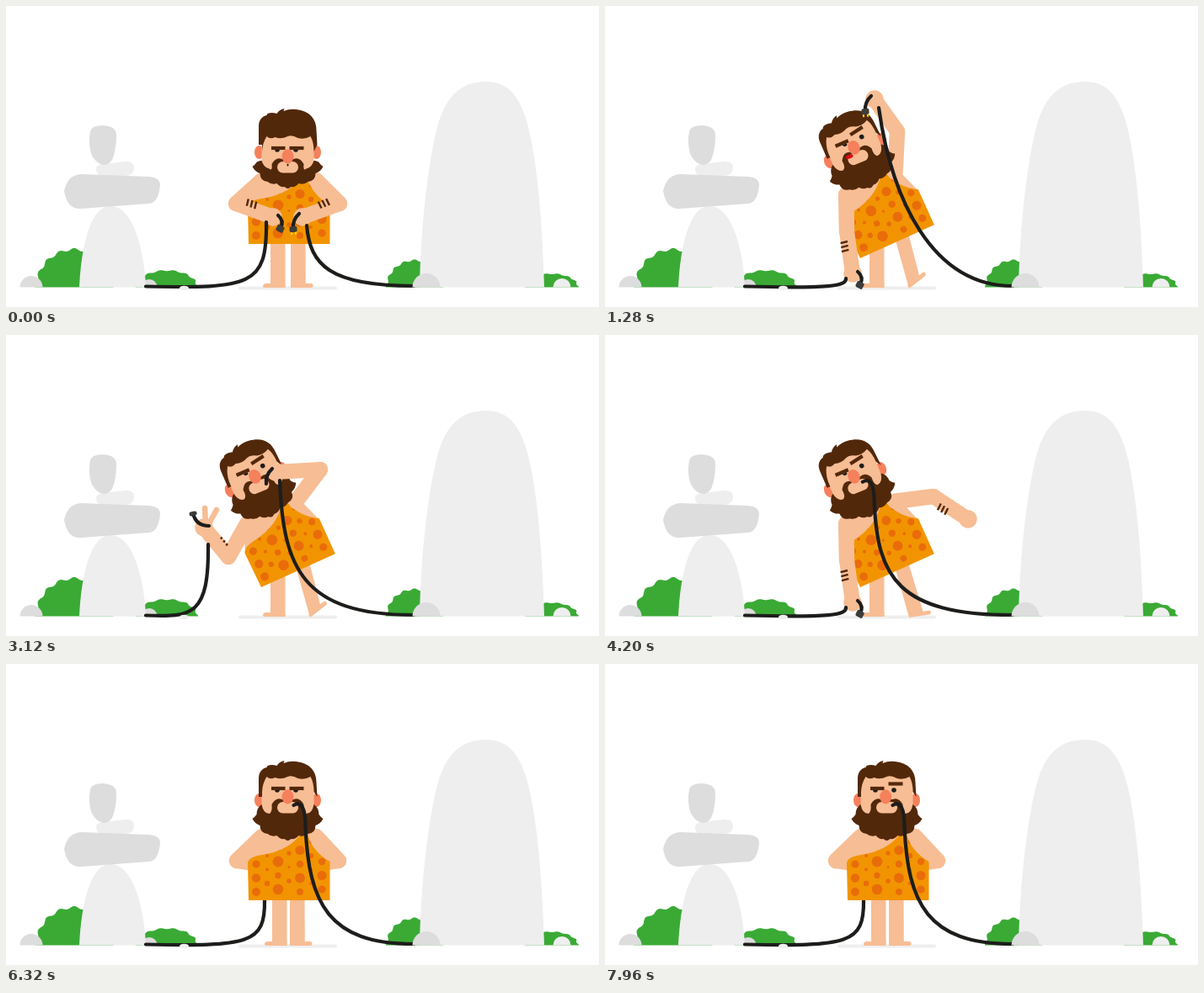
These frames come from a looping animation (704x358 px, 8000 ms). An HTML page with a canvas:

```html
<!DOCTYPE html>
<html lang="en">
<head>
<meta charset="utf-8">
<title>Caveman with cables</title>
<style>
html, body { margin: 0; width: 100%; height: 100%; overflow: hidden; background: #fff; }
canvas { display: block; width: 704px; height: 358px; }
</style>
</head>
<body>
<canvas id="stage" width="704" height="358"></canvas>
<script>
const ctx = document.getElementById('stage').getContext('2d');
const LOOP = 8000, TAU = Math.PI * 2, RAD = Math.PI / 180, GROUND = 334.5;
const SKIN = '#f7bd94', HAIR = '#52280b', PINK = '#f5805c', CLOTH = '#f29400', SPOT = '#e96c0a',
  GREEN = '#3aaa35', PALE = '#eeeeee', GREY = '#dddddd', CORD = '#1d1d1b', PLUG = '#3c3c3b';

// Motion helpers

function ramp(t, from, to) {
  const u = Math.min(1, Math.max(0, (t - from) / (to - from)));
  return u * u * (3 - 2 * u);
}
const mix = (a, b, k) => a + (b - a) * k;
const blend = (a, b, k) => a.map((v, i) => mix(v, b[i], k));
const offset = ([x, y], dx, dy) => [x + dx, y + dy];
function turned([x, y], dx, dy, angle) {
  const c = Math.cos(angle), s = Math.sin(angle);
  return [x + dx * c - dy * s, y + dx * s + dy * c];
}
// Each move is [begin, end, pose].
const follow = (t, first, moves) =>
  moves.reduce((pose, [from, to, next]) => blend(pose, next, ramp(t, from, to)), first);

// Arm poses: elbow, then hand
const mirror = ([ex, ey, hx, hy]) => [669 - ex, ey, 669 - hx, hy];
const FRONT = [273, 235, 317, 251], BEHIND = [274, 234, 300, 238];
const LOW = [287, 268, 294, 318], RAISED = [264, 264, 235, 229];
const OVERHEAD = [347, 149, 320, 111], MOUTH = [373, 160, 320, 163],
  SWING = [372, 152, 362, 117], OUT = [390, 192, 431, 219], HIP = [381, 215, 362, 235];

function poseAt(t) {
  const stand = ramp(t, 5920, 6240), down = 1 - ramp(t, 80, 540);
  const lean = ramp(t, 100, 540) - stand;
  const bob = t > 6320 ? Math.sin(TAU * (t - 6320) / 820) : 0;
  const lookBack = ramp(t, 7360, 7680);
  return {
    t, stand, down, lean,
    body: blend([336, 281 + 2 * down], [346.7, 280.2], lean),
    bodyAngle: -24.4 * RAD * lean,
    head: offset(blend([334.5, 162], [297, 172], lean), 0, 7 * down - bob),
    headAngle: -23 * RAD * lean,
    raise: lean + lookBack,
    gaze: 4 * lean + 2 * ramp(t, 6760, 7040) - 3 * lookBack,
    tongue: ramp(t, 400, 600) - ramp(t, 1450, 1600),
    lift: ramp(t, 1900, 2480) - ramp(t, 3400, 3800),
    release: ramp(t, 3400, 3640),
    left: follow(t, FRONT, [[100, 560, LOW], [1900, 2480, RAISED], [3400, 3800, LOW], [5920, 6240, BEHIND]]),
    right: follow(t, mirror(FRONT), [[100, 620, OVERHEAD], [1300, 1680, MOUTH], [3400, 3640, SWING],
      [3640, 4000, OUT], [4240, 4600, HIP], [5920, 6240, mirror(BEHIND)]])
  };
}

// Drawing helpers

function fill(color, path) {
  ctx.fillStyle = color;
  ctx.fill(typeof path === 'string' ? new Path2D(path) : path);
}
function stroke(color, width, path) {
  ctx.strokeStyle = color;
  ctx.lineWidth = width;
  ctx.stroke(new Path2D(path));
}
function oval(color, x, y, rx, ry = rx, from = 0) {
  ctx.fillStyle = color;
  ctx.beginPath();
  ctx.ellipse(x, y, rx, ry, 0, from, TAU);
  ctx.fill();
}
const mound = (color, x, r) => oval(color, x, GROUND, r, r, Math.PI);
function box(color, x, y, w, h, r = 0) {
  ctx.fillStyle = color;
  ctx.beginPath();
  ctx.roundRect(x, y, w, h, r);
  ctx.fill();
}
function placed([x, y], angle, draw) {
  ctx.save();
  ctx.translate(x, y);
  ctx.rotate(angle);
  draw();
  ctx.restore();
}

// Scenery

function bush(x, rx, ry, waves) {
  ctx.fillStyle = GREEN;
  ctx.beginPath();
  for (let u = 0; u <= 1; u += 1 / 120) {
    const a = Math.PI * (1 + u), r = 1 + .035 * Math.cos(u * TAU * waves);
    ctx.lineTo(x + rx * r * Math.cos(a), GROUND + ry * r * Math.sin(a));
  }
  ctx.fill();
}

function drawScenery() {
  bush(81, 45, 45, 8);
  bush(191, 36, 20, 7);
  bush(485, 33, 32, 8);
  bush(648, 31, 16, 7);
  mound(GREY, 170, 9.5);
  fill(PALE, 'M87 334.5C89 290 99 238 124 238C151 238 164 290 166 334.5Z');
  fill(PALE, 'M107 195Q106 189 115 188L141 185Q152 184 152 192Q152 201 143 202H114Q108 202 107 195Z');
  fill(GREY, 'M100 149Q102 142 115 142Q132 143 131 155Q131 171 126 183Q122 189 116 189Q109 189 102 178Q97 165 100 149Z');
  fill(GREY, 'M69 220Q73 201 89 200L170 203Q183 204 183 213Q181 234 170 235L90 241Q73 243 69 220Z');
  mound(GREY, 30, 13.5);
  fill(PALE, 'M491 334.5C492 275 499 195 512 144C522 106 541 90 570 90C598 90 612 110 621 148C633 200 637 275 639 334.5Z');
  mound(PALE, 660, 10.5);
  box(PALE, 276, 333.5, 117, 4, 2);
}

// Caveman

function drawLegs({ t, lean, stand }) {
  const leftX = 314 + 2 * stand, rightX = 338 - stand + 5 * lean;
  box(SKIN, leftX, 270, 17.5, 65);
  box(SKIN, leftX - 9, 330, 26.5, 5, [5, 0, 0, 2]);

  const tapping = t > 3400 && t < 5920;
  const angle = (tapping ? -22 - 16 * Math.cos(TAU * (t - 3400) / 506) : -38 * lean) * RAD;
  const heel = [mix(338 - stand, 361, lean), 335 + lean];
  const at = (x, y) => turned(heel, x, y, angle).join(' ');
  fill(SKIN, `M${rightX} 272h17.5L${at(17.8, -2)}L${at(0, 0)}Z`);
  stroke(SKIN, 5, `M${at(3, -2.5)}L${at(24, -2.5)}`);
}

function drawTorso({ body, bodyAngle }) {
  placed(body, bodyAngle, () => {
    ctx.translate(-336, -281);
    fill(SKIN, 'M312 193L301 199L287 238H384.5L372 203L357 193Z');
    const cloth = new Path2D('M288 281L287 236Q289 229 304 227Q336 222 350 202L358 203Q364 223 384.5 235V281Z');
    fill(CLOTH, cloth);
    ctx.clip(cloth);
    for (let row = 0; row < 4; row++) {
      for (let col = 0; col < 4; col++) {
        const x = 297 + 26 * col, y = 271 - 16.5 * row - 3 * (col % 2);
        oval(SPOT, x, y, 5 + 1.4 * Math.sin(col * 2 + row * 3));
        oval(SPOT, x + 13, y - 10, 2.4 + .8 * Math.cos(col + row * 2));
      }
    }
  });
}

function drawEye(x, y, open) {
  const a = open * Math.PI / 2;
  ctx.fillStyle = CORD;
  ctx.beginPath();
  ctx.arc(x, y, 2.8, -a, Math.PI + a);
  ctx.fill();
}

function drawBeard(f) {
  const half = `M1 ${f - 1}H-7Q-14 ${f - 4} -19 ${5 + f}Q-18 ${14 + f} -22 ${16 + f * .6}
    Q-29 ${16 + f * .5} -31 ${5 + f * .7}Q-37 ${9 + f * .5} -37 17Q-39 20 -42 22Q-39 28 -33 30
    Q-33 39 -24 40Q-19 44 -13 42Q-9 47 -4 46Q-2 48 1 48Z`;
  fill(HAIR, half);
  ctx.scale(-1, 1);
  fill(HAIR, half);
  ctx.scale(-1, 1);
}

function drawHead({ head, headAngle, down, lean, raise, gaze, tongue }) {
  const f = 14 * down; // looking down slides the face
  placed(head, headAngle, () => {
    for (const side of [-1, 1]) oval(PINK, side * 34, 5 * down, 5.5, 8);
    box(SKIN, -31, -36, 62, 62, 12);
    fill(HAIR, `M-34.5 -4V-27C-34 -34 -30 -38 -25 -39L-24 -41Q-19 -43 -13 -41Q-10 -46 -4 -47L-5 -44Q2 -47 10 -46
      C26 -44 34 -35 34 -21L35 -4L31 ${f - 10}Q31 ${f - 21} 27 ${f - 28}Q20 ${f - 24} 12 ${f - 26}
      Q5 ${f - 30} 0 ${f - 28}Q-8 ${f - 24} -15 ${f - 27}Q-21 ${f - 24} -25 ${f - 28}Q-30 ${f - 20} -30.5 ${f - 10}V-4Z`);
    drawBeard(f);
    box(SKIN, -12.5, 2 + f, 25, 13.5, 6.5);
    oval('#e30613', -9, 4 + f, 4.5 * tongue, 2.3 * tongue);
    oval(CORD, 0, 6 + f, down, 1.5 * down);
    drawEye(gaze - 12.5, f - 12, 0);
    drawEye(gaze + 9.5, f - 12, raise);
    ctx.lineCap = 'butt';
    const brow = f - 14 - 5.5 * raise;
    stroke(HAIR, 4.2, `M-19.5 ${f - 14}H-3`);
    stroke(HAIR, 4.2, `M2 ${brow}L19 ${brow - 3 * lean}`);
    ctx.lineCap = 'round';
    oval(PINK, Math.min(0, gaze) * 1.3, f - 4, 7, 8.5);
  });
}

function makeArm(side, pose) {
  const [ex, ey, hx, hy] = side < 0 ? pose.left : pose.right;
  const shoulder = turned(pose.body, side * 32, -76, pose.bodyAngle);
  return {
    hand: [hx, hy],
    upper: () => stroke(SKIN, 18.5, `M${shoulder}L${ex} ${ey}`),
    lower: () => {
      stroke(SKIN, 18, `M${ex} ${ey}L${hx} ${hy}`);
      oval(SKIN, hx, hy, 10.7);
    },
    bands: (shift, half) => placed([ex, ey], Math.atan2(hy - ey, hx - ex), () => {
      ctx.lineCap = 'butt';
      for (let x = 12; x < 25; x += 5) stroke(HAIR, 2.4, `M${x} ${shift - half}L${x + 1} ${shift + half}`);
      ctx.lineCap = 'round';
    })
  };
}

function drawFingers([x, y], lift) {
  stroke(SKIN, 6.5, `M${x + 2} ${y - 4}l-1 ${-19 * lift}`);
  stroke(SKIN, 6.5, `M${x + 5} ${y - 3}l${10 * lift} ${-18 * lift}`);
}

// Cables

function drawLeftCord([x, y]) {
  stroke(CORD, 4.2, `M166 333.5C${x - 18} 336 ${x + 1} 333 ${x} ${y}`);
}

// A high end pulls the slack out of the curve.
function drawRightCord([x, y]) {
  const taut = Math.max(0, 165 - y);
  const bendY = y + (333 - y) * .65 - taut * .7;
  stroke(CORD, 4.2, `M484 333C${x + 27 + taut * .8} 333 ${x + 4 + taut * .25} ${bendY} ${x} ${y}`);
}

function bulge([sx, sy], [x, y], amount) {
  return [(sx + x) / 2 + (y - sy) * amount, (sy + y) / 2 - (x - sx) * amount];
}

function drawTail(start, bend, tip) {
  stroke(CORD, 4.2, `M${start}Q${bend} ${tip}`);
}

function drawPlug(bend, tip, height, prongs) {
  placed(tip, Math.atan2(tip[1] - bend[1], tip[0] - bend[0]) - Math.PI / 2, () => {
    if (prongs) for (const x of [-3.5, 1.5]) box('#ffde00', x, 3, 2, 4);
    box(PLUG, -4.5, -3, 9, height, 2);
  });
}

function drawLeftCable({ t, lift }, hand) {
  drawLeftCord(offset(hand, mix(-8, 5, lift), mix(6, 20, lift)));
  const start = offset(hand, 6, -2);
  const tip = offset(hand, mix(9, -13, lift), mix(13, -17, lift));
  const bend = bulge(start, tip, .4);
  drawTail(start, bend, tip);
  if (t < 4400) drawPlug(bend, tip, mix(8, 5, lift), false);
}

function drawRightCable({ t, head, headAngle, release }, hand) {
  const mouth = turned(head, 7, 6, headAngle);
  const heldStart = offset(hand, -4, -4), heldTip = offset(hand, -11, 14);
  const end = blend(offset(hand, 5, 10), offset(mouth, 14, 26), release);
  const start = blend(heldStart, end, release);
  const tip = blend(heldTip, mouth, release);
  const bend = blend(bulge(heldStart, heldTip, -.25), offset(mouth, 14, -8), release);
  drawRightCord(end);
  drawTail(start, bend, tip);
  if (t < 1600) drawPlug(bend, tip, 7, true);
}

function drawScene(t) {
  const pose = poseAt(t);
  const left = makeArm(-1, pose), right = makeArm(1, pose);
  const leftBack = t > 6080, rightBack = t > 4440;

  ctx.fillStyle = '#fff';
  ctx.fillRect(0, 0, 704, 358);
  ctx.lineCap = ctx.lineJoin = 'round';
  drawScenery();

  if (leftBack) drawLeftCord([307, 280]);
  drawLegs(pose);
  if (leftBack) { left.upper(); left.lower(); }
  if (rightBack) { right.upper(); right.lower(); }
  drawTorso(pose);
  if (!leftBack) left.upper();
  if (!rightBack) right.upper();
  drawHead(pose);
  if (!leftBack) {
    left.lower();
    left.bands(11 * ramp(t, 100, 400) - 6 + 3 * pose.lift, mix(4.3, 1.3, pose.lift));
    if (pose.lift > 0) drawFingers(left.hand, pose.lift);
  }
  if (!rightBack) {
    right.lower();
    if (t < 300 || t > 3760) right.bands(6.5, 4.3);
  }
  if (!leftBack) drawLeftCable(pose, left.hand);
  drawRightCable(pose, right.hand);

  mound(GREY, 499, 16.5);
  oval(PALE, 211.5, 335.5, 5.5, 2.8);
}

const start = performance.now();
function tick() {
  drawScene((performance.now() - start) % LOOP);
  requestAnimationFrame(tick);
}
tick();
</script>
</body>
</html>
```
